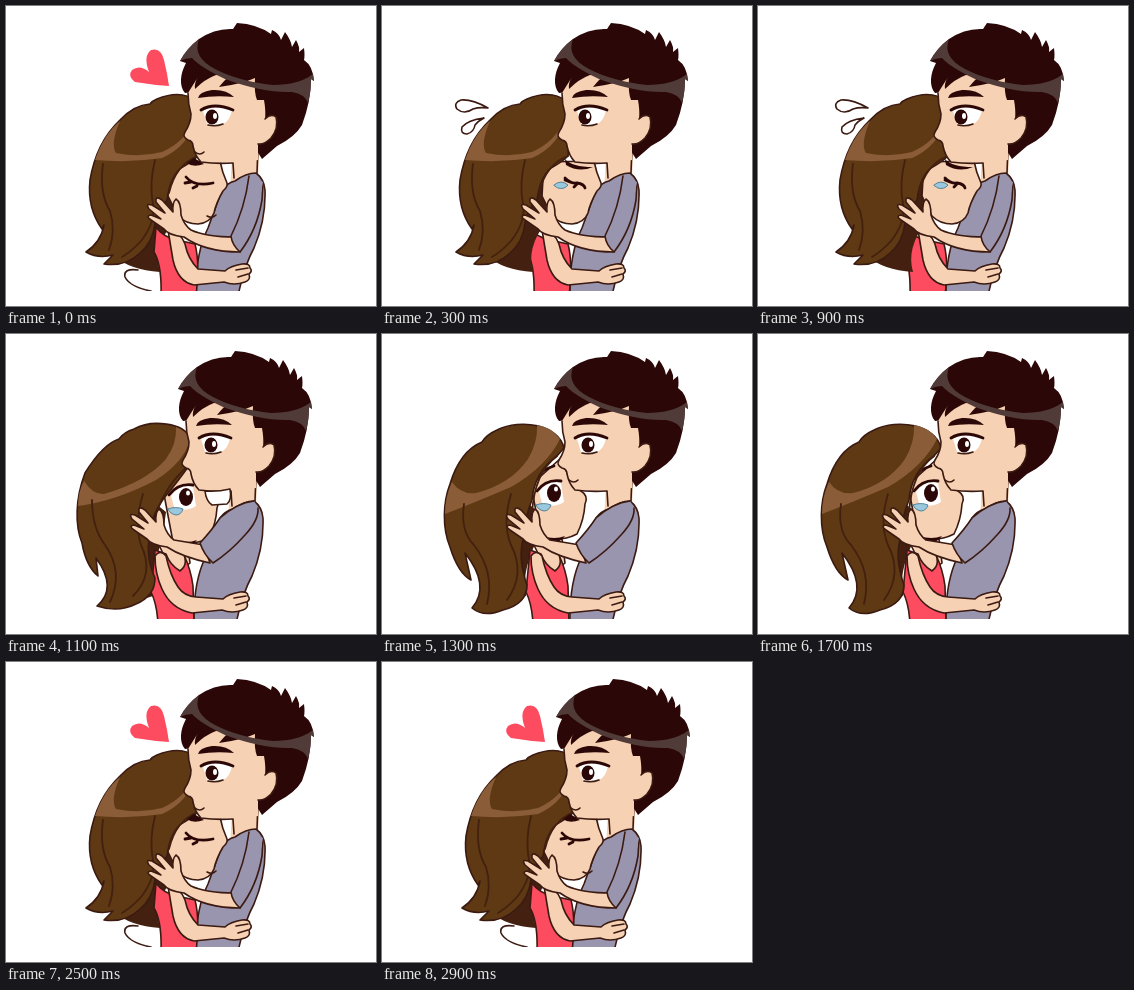
Recreate the animation shown at these times as an HTML page. Size 370 by 300 pixels, loop 3.1 s.

```html
<!DOCTYPE html>
<html lang="en">
<head>
<meta charset="utf-8">
<title>Hug</title>
<style>
html, body { margin: 0; width: 100%; height: 100%; overflow: hidden; background: #fff; }
svg { display: block; width: 370px; height: 300px; }
path { stroke-linejoin: round; stroke-linecap: round; }
.line { fill: none; stroke: #3b1a12; stroke-width: 1.6; }
.edge { stroke: #3b1a12; stroke-width: 1.6; }
.skin { fill: #f6d1b3; }
.dark { fill: #2b0707; }
.lash { fill: none; stroke: #2b0707; stroke-width: 2.8; }
.shine { fill: #503b38; }
.hair { fill: #5f3913; }
.back { fill: #43200f; }
.lock { fill: none; stroke: #43200f; stroke-width: 1.8; }
.gloss { fill: #8a5d38; }
.dress, .heart { fill: #fd4b60; }
.shirt { fill: #9a95ae; }
.white { fill: #fff; }
.tear { fill: #9ac8dd; stroke: #37718f; stroke-width: .8; }
</style>
</head>
<body>
<svg id="stage" viewBox="0 0 370 300"></svg>
<script>
const p = (cls, d) => `<path class="${cls}" d="${d}"/>`;
const g = (id, body) => `<g id="${id}">${body}</g>`;
const at = (x, y, body) => `<g transform="translate(${x} ${y})">${body}</g>`;
const oval = (cls, x, y, rx, ry) => `<ellipse class="${cls}" cx="${x}" cy="${y}" rx="${rx}" ry="${ry}"/>`;

const torso =
  p('skin', 'M224 148L252 136L250 172L222 188Z') +
  p('line', 'M250 139L249 167M225 157L226 172') +
  p('shirt edge', 'M214 184Q219 177 227 175Q238 167 248 167Q256 173 257 184Q258 214 246 242Q236 260 230 290L188 290Q187 248 200 222Z');

const handShape = 'Q145 211 141 205L128 196Q122 192 128 191L138 195L126 185Q122 179 129 181L142 189L133 178Q132 171 139 176L150 188Q149 179 153 175Q158 178 158 191Q161 201 168 206';
const forearm = 'M204 229Q176 223 161 213' + handShape;
const liftedArm =
  p('skin edge', forearm + 'L198 211Z') +
  p('shirt edge', 'M248 167Q231 169 214 184Q206 196 194 209Q198 221 207 229Q224 218 239 201Q253 186 252 174');

const hugArm =
  at(15, 18, p('skin edge', 'M217 228Q182 228 161 213' + handShape + 'Q183 213 212 213Z')) +
  p('shirt edge', 'M241 170Q237 202 223 230Q224 239 232 246Q249 224 254 194L255 177') +
  p('shirt', 'M242 171L255 176L252 192L239 194Z');

const waistEnd = 'L217 265Q222 260 234 258Q242 257 242 262Q245 265 241 268Q243 274 237 276Q226 280 216 276L186 279';
const fingers = p('line', 'M228 264L240 262M230 271L240 268');
const nestledWaist = p('skin edge', 'M160 224Q173 226 177 238Q180 253 190 263' + waistEnd + 'Q170 276 165 254Z') + fingers;
const lookWaist = p('skin edge', 'M149 222Q154 215 160 222Q164 241 172 253Q178 262 190 263' + waistEnd + 'Q165 275 156 255Q149 240 149 222Z') + fingers;

const nestledFace =
  p('skin edge', 'M162 156L212 155Q214 166 219 177Q220 181 215 185Q208 197 206 207Q202 217 190 218Q178 218 170 210L160 190Z');
const nestledDress =
  p('dress edge', 'M147 221Q154 231 168 234L186 238Q191 257 187 290L152 290Q153 259 145 246Z');

const nestledHair =
  p('hair edge', 'M184 95C174 87 162 86 145 93Q140 95 138 98Q122 99 108 114C91 130 82 150 78 174Q75 202 90 223L92 219Q89 236 74 246Q86 253 101 249L92 258Q114 261 128 247Q141 236 143 217Q145 204 155 194Q158 171 169 162Q180 156 186 150L188 126Z') +
  p('gloss', 'M83 154Q92 128 108 115Q98 138 104 147Q127 152 150 146Q173 136 184 112Q177 140 150 152Q118 157 83 154Z') +
  p('lock', 'M91 158Q87 187 98 205Q104 225 97 244M143 154Q137 178 141 198Q144 216 129 235Q120 245 110 251M186 150Q164 158 157 187');
const nestledBack = p('back', 'M145 165L164 175L164 216Q144 242 151 266Q121 264 105 250Z');

const hugGirl =
  at(3, 0, nestledBack + nestledDress) +
  p('line', 'M145 285Q124 281 119 271Q117 262 132 264') +
  at(2, 0, nestledFace) +
  p('lash', 'M180 171Q188 181 207 177M185 176L179 177M191 180L187 182') +
  p('line', 'M201 210Q206 213 210 209') +
  at(6, 0, nestledHair) +
  p('dark', 'M181 157Q187 162 198 158L188 152Z');

const sadGirl =
  nestledBack + nestledFace +
  p('lash', 'M183 172Q189 178 195 177Q202 178 203 182M188 176L183 174M195 178L192 181') +
  nestledHair +
  p('dark', 'M183 153Q190 161 211 161Q197 167 184 159Z') +
  p('tear', 'M172 179Q179 173 186 179Q182 184 176 182Z');

const marks =
  p('white edge', 'M106 102Q90 93 79 94Q71 97 75 103Q82 109 91 103Q97 101 106 102Z') +
  p('white edge', 'M102 112Q86 114 80 121Q78 128 85 128Q92 126 93 119Q96 115 102 112Z');

const lookDress =
  p('skin edge', 'M150 205L181 205L184 229L168 242Z') +
  p('dress edge', 'M149 216L160 220Q164 231 174 237Q182 231 178 221Q185 236 187 252L188 290L152 290Q151 270 145 258Z');

const lookFace =
  p('skin edge', 'M150 151L180 124Q188 148 200 157Q208 162 204 170Q203 186 196 200Q181 208 160 204Z') +
  p('dark', 'M161 202Q174 206 184 202Q177 211 168 207Z') +
  p('white', 'M158 158Q168 145 180 149L183 168Q172 175 161 169Z') +
  oval('dark', 173, 159, 7, 9) + oval('white', 175, 155, 2, 2.5) +
  p('lash', 'M156 157Q165 145 180 147') +
  p('tear', 'M155 171Q163 168 170 171Q168 177 163 177Q157 176 155 171Z');

const turnGirl =
  p('back', 'M144 165L160 178L156 208Q142 240 147 262Q124 270 112 259Z') + lookDress +
  at(7, 4, lookFace) +
  p('hair edge', 'M184 104C178 89 146 85 128 95Q118 98 113 105Q97 110 79 139C69 165 69 192 76 209Q80 232 92 242L90 224Q112 254 91 272Q112 279 130 270Q149 262 149 244Q139 222 144 202Q145 181 158 164Q173 146 182 133Q187 121 184 104Z') +
  p('gloss', 'M72 172Q72 158 78 147Q87 161 98 160Q140 148 160 125Q171 110 170 93Q181 97 184 106Q178 128 150 146Q110 167 72 172Z') +
  p('lock', 'M86 166Q86 194 99 211Q118 238 104 268M137 160Q128 190 135 211Q149 240 127 262M181 133Q160 151 150 180');

const gazeGirl =
  p('back', 'M142 165L157 178L155 208Q140 240 145 262Q124 270 112 259Z') + lookDress +
  lookFace + p('lash', 'M156 144Q162 135 173 132') +
  p('hair edge', 'M183 114C178 91 140 84 116 96Q105 101 101 108Q79 117 69 150C62 168 61 194 69 213Q77 239 90 246L84 219Q110 252 91 274Q103 284 122 276Q146 270 146 251Q136 222 143 203Q144 182 151 166Q153 139 176 122Z') +
  p('gloss', 'M64 180Q64 163 71 148Q80 161 95 159Q130 150 147 125Q157 108 156 91Q170 93 179 105Q165 133 130 153Q95 168 64 180Z') +
  p('lock', 'M83 170Q79 197 93 211Q114 238 106 270M130 160Q121 190 130 211Q145 240 126 266M176 122Q153 139 151 180');

const head =
  p('dark', 'M177 87C171 80 172 68 178 57L172 55Q179 42 191 33Q207 22 225 23L229 17Q249 18 263 28L264 24Q271 27 273 34L277 26Q283 34 284 41L288 34Q292 41 291 46L296 42Q297 50 296 54Q305 60 306 75L303 73Q303 95 294 119Q287 131 269 140L254 153L249 145L238 80Z') +
  p('skin', 'M180 87L190 71Q186 77 187 83Q197 73 208 69L221 70Q215 76 211 81Q234 78 247 72Q246 87 249 94L256 94Q258 105 257 113Q263 107 268 111Q271 122 263 132Q256 139 250 138L250 154L225 157Q208 157 193 156Q187 150 185 140Q185 135 180 134Q174 131 177 126Q183 117 183 108Q180 98 180 87Z') +
  p('line', 'M180 87Q180 98 183 108Q183 117 177 126Q174 131 180 134Q185 135 185 140Q187 150 193 156Q208 158 225 157M257 113Q263 107 268 111Q271 122 263 132Q256 139 250 138') +
  p('shine', 'M172 55Q179 42 191 33Q184 51 207 63Q230 75 265 79Q291 79 305 68L306 75L303 73Q303 86 300 97Q297 88 284 86Q255 87 217 73Q192 61 184 52Q178 52 172 55Z') +
  p('dark', 'M190 92Q191 86 204 84Q218 83 226 91Q207 89 190 92Z') +
  p('white', 'M195 105Q207 98 224 104Q222 115 215 118Q205 120 199 118Z') +
  g('pupil', oval('dark', 203, 111, 6.5, 7.5) + oval('white', 206, 110, 2, 3)) +
  p('lash', 'M193 104Q206 96 225 104') +
  p('line', 'M200 119Q207 121 215 118') +
  g('smile', p('line', 'M187 146Q192 150 196 146')) +
  g('grin', p('white edge', 'M199 157Q211 158 224 155Q226 166 221 170L206 171Q200 167 199 157Z'));

const heart = p('heart', 'M163 80Q147 79 129 76Q121 70 126 64Q134 58 143 66Q137 50 145 44Q155 41 158 54Q161 66 163 80Z');

const stage = document.getElementById('stage');
stage.innerHTML =
  '<clipPath id="floor"><rect width="370" height="285"/></clipPath><g clip-path="url(#floor)">' +
  g('torso', torso) + g('sadDress', nestledDress) +
  g('hug', hugGirl) + g('sad', sadGirl) + g('turn', turnGirl) + g('gaze', gazeGirl) +
  g('head', head) + g('nestledArms', nestledWaist + hugArm) + g('lookArms', lookWaist + liftedArm) +
  g('marks', marks) + g('heart', heart) + '</g>';

const part = id => document.getElementById(id);
const show = (id, on) => part(id).setAttribute('visibility', on ? 'visible' : 'hidden');
const move = (id, x, y = 0) => part(id).setAttribute('transform', `translate(${x} ${y})`);

// [start ms, pose, shift of the pose's moving part, grin]
const steps = [
  [0, 'hug', 0], [100, 'sad', 4], [300, 'sad', 0], [500, 'sad', 4], [700, 'sad', 0], [900, 'sad', 4],
  [1100, 'turn', 0, true], [1300, 'gaze', -1], [1500, 'gaze', 0, true], [1700, 'gaze', 0],
  [2300, 'hug', -7], [2500, 'hug', 0], [2700, 'hug', -7], [2900, 'hug', 0]
];
const pupilX = { hug: 1, sad: 0, turn: 2, gaze: 3 };

function pose([, name, shift, grin = false]) {
  const hugging = name === 'hug', sad = name === 'sad', nestled = hugging || sad;
  for (const id of ['hug', 'sad', 'turn', 'gaze']) show(id, id === name);
  show('sadDress', sad);
  show('marks', sad);
  show('heart', hugging);
  show('nestledArms', nestled);
  show('lookArms', !nestled);
  show('grin', grin);
  show('smile', !sad && !grin);
  for (const id of ['head', 'torso', 'nestledArms']) move(id, hugging ? 2 : 0);
  move('pupil', pupilX[name]);
  if (hugging) move('heart', shift, shift * 4 / 7);
  else move(name, shift);
  move('marks', shift);
}

let current;
const start = performance.now();
function draw() {
  const time = (performance.now() - start) % 3100;
  const step = steps.findLast(s => s[0] <= time);
  if (step !== current) pose(current = step);
  requestAnimationFrame(draw);
}
draw();
</script>
</body>
</html>
```
